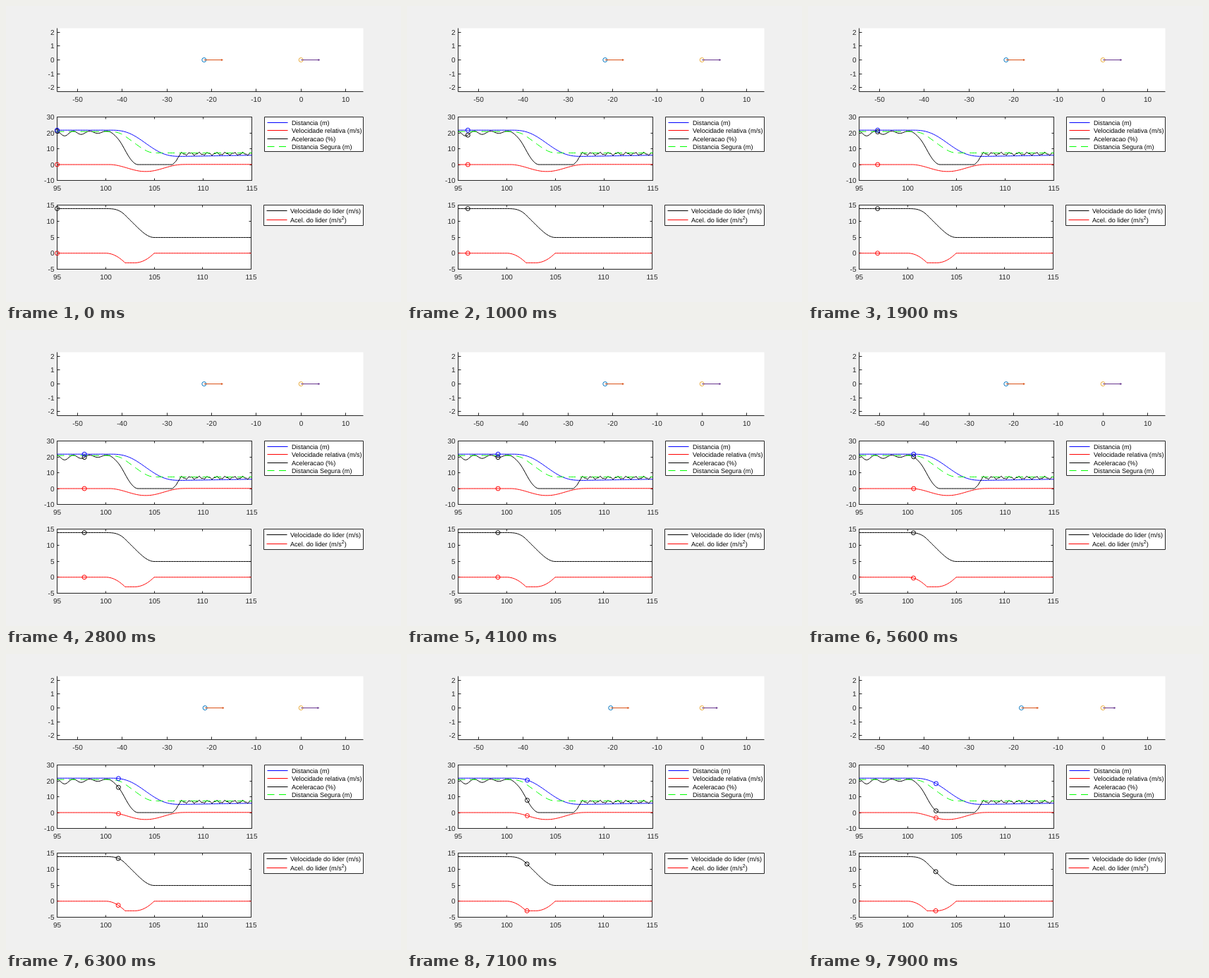
Animation of 560 by 420 pixels, one loop 8 s. Source, as an HTML page with a canvas:

```html
<!DOCTYPE html>
<html lang="pt">
<head>
<meta charset="utf-8">
<title>Distancia e velocidade</title>
<style>
html, body { margin: 0; width: 560px; height: 420px; overflow: hidden; background: #f0f0f0; }
canvas { display: block; }
</style>
</head>
<body>
<canvas id="stage" width="560" height="420"></canvas>
<script>
const ctx = document.getElementById('stage').getContext('2d');
const INK = '#262626', BLUE = '#0000ff', RED = '#ff0000', BLACK = '#000', GREEN = '#00ff00';
const FONT = '"Liberation Sans", Arial, sans-serif';
const LOOP = 8000, STEP = 100, T0 = 95, T1 = 115, DT = 0.1;
const DASH = [10, 6.5];

function smooth(a, b, t) {
  const u = Math.min(1, Math.max(0, (t - a) / (b - a)));
  return u * u * (3 - 2 * u);
}

const wave = (t, period) => Math.sin(2 * Math.PI * t / period);

// Leader: braking ramps up, holds, then releases
function leadAcc(t) {
  if (t < 100 || t > 105) return 0;
  if (t < 102) return -0.75 * (t - 100) ** 2;
  if (t < 103) return -3;
  return -3 + 0.75 * (t - 103) ** 2;
}

function leadSpeed(t) {
  if (t < 100) return 13.9;
  if (t < 102) return 13.9 - 0.25 * (t - 100) ** 3;
  if (t < 103) return 11.9 - 3 * (t - 102);
  if (t < 105) return 8.9 - 3 * (t - 103) + 0.25 * (t - 103) ** 3;
  return 4.9;
}

const safeGap = t => 1.5 * leadSpeed(t);

const relSpeed = t =>
  -4.35 * (smooth(100.4, 104, t) - smooth(104.2, 107.8, t)) + 0.1 * smooth(107.4, 108.4, t);

// The gap is the running integral of the relative speed
const gaps = [21.7];
for (let i = 0; i < 200; i++) gaps.push(gaps[i] + DT * relSpeed(T0 + (i + 0.5) * DT));
const gap = t => gaps[Math.round((t - T0) / DT)];

// Decaying hunting, release to zero, then a rippling cruise
function throttle(t) {
  const dip = 1.8 * Math.exp(-0.22 * (t - T0)) * (1 + wave(t - 95.375, 1.7));
  const cruise = 6.8 + 0.7 * wave(t - 107.55, 0.9) + 0.35 * wave(t, 0.37);
  return (21.1 - dip) * (1 - smooth(100.4, 103.3, t)) + cruise * smooth(106.8, 107.8, t);
}

function axes(left, right, top, bottom, x0, x1, y0, y1) {
  return {
    left, right, top, bottom,
    x: v => left + (v - x0) / (x1 - x0) * (right - left),
    y: v => bottom - (v - y0) / (y1 - y0) * (bottom - top)
  };
}

const road = axes(72.5, 506.5, 31.5, 121.5, -54.6, 13.95, -2.3, 2.3);
const chase = axes(72.5, 348.5, 157.5, 247.5, T0, T1, -10, 30);
const lead = axes(72.5, 347.5, 282.5, 373.5, T0, T1, -5, 15);

function stroke(color, points, dash = []) {
  ctx.strokeStyle = color;
  ctx.setLineDash(dash);
  ctx.beginPath();
  for (const [x, y] of points) ctx.lineTo(x, y);
  ctx.stroke();
  ctx.setLineDash([]);
}

function text(str, x, y, size, align, color = BLACK) {
  ctx.font = size + 'px ' + FONT;
  ctx.textAlign = align;
  ctx.fillStyle = color;
  ctx.fillText(str, x, y);
}

function ring(color, x, y) {
  ctx.strokeStyle = color;
  ctx.beginPath();
  ctx.arc(x, y, 3, 0, 2 * Math.PI);
  ctx.stroke();
}

const crisp = v => Math.floor(v) + 0.5;

function range(from, to, step) {
  const out = [];
  for (let v = from; v <= to; v += step) out.push(v);
  return out;
}

function frame(a, xs, ys, tick, boxed) {
  ctx.fillStyle = '#fff';
  ctx.fillRect(a.left, a.top, a.right - a.left, a.bottom - a.top);
  if (boxed) {
    ctx.strokeStyle = INK;
    ctx.strokeRect(a.left, a.top, a.right - a.left, a.bottom - a.top);
  } else {
    stroke(INK, [[a.left, a.top], [a.left, a.bottom], [a.right, a.bottom]]);
  }
  for (const v of xs) {
    const x = crisp(a.x(v));
    stroke(INK, [[x, a.bottom], [x, a.bottom - tick]]);
    if (boxed) stroke(INK, [[x, a.top], [x, a.top + tick]]);
    text(String(v), x, a.bottom + 14, 10, 'center', INK);
  }
  for (const v of ys) {
    const y = crisp(a.y(v));
    stroke(INK, [[a.left, y], [a.left + tick, y]]);
    if (boxed) stroke(INK, [[a.right, y], [a.right - tick, y]]);
    text(String(v), a.left - 4, y + 3.7, 10, 'right', INK);
  }
}

function plot(a, color, fn, dash) {
  stroke(color, range(0, 200, 1).map(i => {
    const t = T0 + i * DT;
    return [a.x(t), a.y(fn(t))];
  }), dash);
}

function mark(a, color, fn, t) {
  ring(color, a.x(t), a.y(fn(t)));
}

function legend(x, y, w, h, textX, rows) {
  ctx.fillStyle = '#fff';
  ctx.fillRect(x, y, w, h);
  ctx.strokeStyle = INK;
  ctx.strokeRect(x, y, w, h);
  for (const [label, color, cy, dash] of rows) {
    stroke(color, [[x + 4, cy], [x + 33, cy]], dash);
    text(label, textX, cy + 3, 9.1, 'left');
  }
}

function car(pos, speed, ringColor, arrowColor) {
  const x = road.x(pos), y = road.y(0), tip = road.x(pos + 0.3 * speed);
  ring(ringColor, x, y);
  stroke(arrowColor, [[x, y], [tip, y]]);
  stroke(arrowColor, [[tip - 2, y - 1], [tip, y], [tip - 2, y + 1]]);
}

function draw(t) {
  ctx.fillStyle = '#f0f0f0';
  ctx.fillRect(0, 0, 560, 420);
  ctx.lineWidth = 1;
  ctx.lineJoin = 'round';
  ctx.textRendering = 'geometricPrecision';

  frame(road, range(-50, 10, 10), range(-2, 2, 1), 4, false);
  car(-gap(t), leadSpeed(t) - relSpeed(t), '#0072bd', '#d95319');
  car(0, leadSpeed(t), '#e8a838', '#68368e');

  const times = range(T0, T1, 5);
  frame(chase, times, range(-10, 30, 10), 3, true);
  plot(chase, BLUE, gap);
  plot(chase, RED, relSpeed);
  plot(chase, BLACK, throttle);
  plot(chase, GREEN, safeGap, DASH);
  mark(chase, BLACK, throttle, t);
  mark(chase, RED, relSpeed, t);
  mark(chase, BLUE, gap, t);

  frame(lead, times, range(-5, 15, 5), 3, true);
  plot(lead, BLACK, leadSpeed);
  plot(lead, RED, leadAcc);
  mark(lead, BLACK, leadSpeed, t);
  mark(lead, RED, leadAcc, t);

  legend(366.5, 157.5, 140, 49, 405, [
    ['Distancia (m)', BLUE, 165.5],
    ['Velocidade relativa (m/s)', RED, 176.5],
    ['Aceleracao (%)', BLACK, 188.5],
    ['Distancia Segura (m)', GREEN, 199.5, DASH]
  ]);
  const accLabel = 'Acel. do lider (m/s';
  legend(365.5, 282.5, 141, 29, 403, [
    ['Velocidade do lider (m/s)', BLACK, 290.5],
    [accLabel, RED, 303.5]
  ]);
  let x = 403 + ctx.measureText(accLabel).width;
  text('2', x, 303, 7, 'left');
  x += ctx.measureText('2').width;
  text(')', x, 306.5, 9.1, 'left');
}

const start = performance.now();
let shown = -1;

function tick() {
  const step = Math.floor((performance.now() - start) % LOOP / STEP);
  if (step !== shown) {
    shown = step;
    draw(T0 + step * DT);
  }
  requestAnimationFrame(tick);
}
tick();
</script>
</body>
</html>
```
